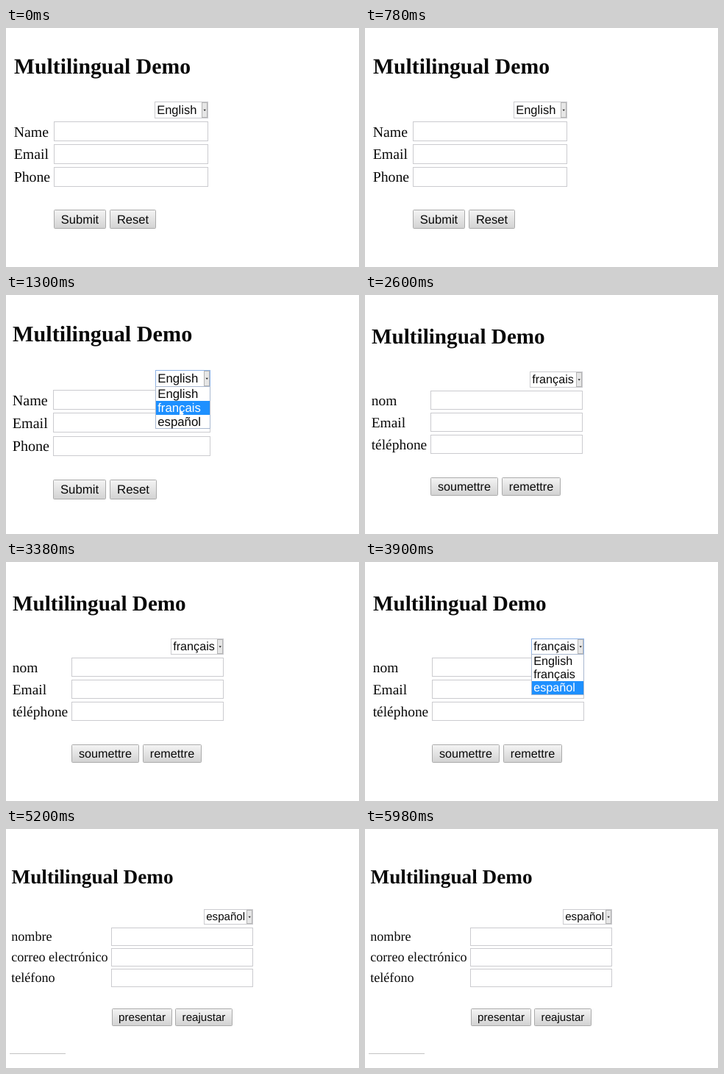
An HTML page that plays this animation: 480 by 325 pixels, repeating every 6.5 s.

```html
<!DOCTYPE html>
<html lang="en">
<head>
<meta charset="utf-8">
<title>Multilingual Demo</title>
<style>
html, body { margin: 0; width: 100%; height: 100%; overflow: hidden; background: #fff; }
svg { display: block; width: 480px; height: 325px; }
.scene { visibility: hidden; animation: show 6.5s step-end infinite; }
@keyframes show { 0% { visibility: visible; } 20%, 100% { visibility: hidden; } }
text { fill: #0a0a0a; white-space: pre; text-rendering: geometricPrecision; }
.title { font-family: "Liberation Serif", "Times New Roman", serif; font-weight: bold; }
.label { font-family: "Liberation Serif", "Times New Roman", serif; }
.ui { font-family: "Liberation Sans", Arial, sans-serif; }
.ui.picked { fill: #fff; }
.field { fill: #fff; stroke: #cbcbcf; }
.open { fill: #fff; stroke: #8db2e6; }
.list { fill: #fff; stroke: #a9b8d0; }
.arrow { fill: #e6e6e6; stroke: #b4b4b4; }
.button { fill: url(#face); stroke: #ababab; }
.hot { fill: #1e90ff; }
</style>
</head>
<body>
<svg id="stage" viewBox="0 0 480 325">
  <defs>
    <linearGradient id="face" x1="0" y1="0" x2="0" y2="1">
      <stop offset="0" stop-color="#f4f4f4"/>
      <stop offset="1" stop-color="#d2d2d2"/>
    </linearGradient>
  </defs>
</svg>
<script>
const languages = ["English", "français", "español"];
const words = [
  { labels: ["Name", "Email", "Phone"], buttons: ["Submit", "Reset"] },
  { labels: ["nom", "Email", "téléphone"], buttons: ["soumettre", "remettre"] },
  { labels: ["nombre", "correo electrónico", "teléfono"], buttons: ["presentar", "reajustar"] }
];

// size: label font size; select: [left, top, right, bottom]; field: [left, right, height]
// buttons: [top, bottom, left, right, left, right]; hot: highlighted menu item
const scenes = [
  { lang: 0, size: 19.8, x: 11, title: 62.2, select: [202, 100, 274, 122], field: [65, 274, 26],
    tops: [127, 158, 189], bases: [147.7, 178.2, 209], buttons: [247, 272, 65, 135, 141, 203] },
  { lang: 0, size: 20.15, x: 9, title: 63, select: [203, 102, 277, 124], field: [64, 277, 26],
    tops: [129, 160, 192], bases: [150, 181, 212], buttons: [251, 277, 64, 135, 141, 204],
    hot: 1, pointer: [236, 156] },
  { lang: 1, size: 19.45, x: 9, title: 65.8, select: [224, 104, 295, 125], field: [89, 295, 25],
    tops: [130, 160, 190], bases: [149.8, 179.8, 209.8], buttons: [248, 272, 89, 180, 186, 265] },
  { lang: 1, size: 19.45, x: 11, title: 65.8, select: [226, 104, 297, 125], field: [91, 297, 25],
    tops: [130, 160, 190], bases: [149.8, 179.8, 209.8], buttons: [248, 272, 91, 182, 188, 267],
    hot: 2 },
  { lang: 2, size: 18.15, x: 7.5, title: 74.4, select: [269, 109, 335, 129], field: [143, 335, 24],
    tops: [134, 162, 190], bases: [152, 180, 208], buttons: [244, 267, 144, 225, 230, 307],
    rule: [5, 81, 305] }
];

function add(parent, tag, attrs, content) {
  const node = document.createElementNS("http://www.w3.org/2000/svg", tag);
  for (const key in attrs) node.setAttribute(key, attrs[key]);
  if (content) node.textContent = content;
  return parent.appendChild(node);
}

function box(g, kind, left, top, right, bottom, rx = 0) {
  add(g, "rect", { class: kind, x: left + .5, y: top + .5, width: right - left, height: bottom - top, rx });
}

function write(g, kind, x, y, size, content, anchor = "start") {
  add(g, "text", { class: kind, x, y, "font-size": size, "text-anchor": anchor }, content);
}

function drawSelect(g, s, small) {
  const [left, top, right, bottom] = s.select;
  const middle = (top + bottom) / 2 + .5;
  box(g, s.hot ? "open" : "field", left, top, right, bottom);
  box(g, "arrow", right - 8, top + 1, right - 1, bottom - 1);
  add(g, "path", { d: `M${right - 5.5} ${middle - .8}h3.4l-1.7 2.2z`, fill: "#222" });
  write(g, "ui", left + 3.2, middle + small * .33, small, languages[s.lang]);
}

function drawMenu(g, s, small) {
  const [left, , right, bottom] = s.select;
  const row = small * 1.13;
  box(g, "list", left, bottom, right, bottom + Math.round(row * 3));
  languages.forEach((name, i) => {
    const y = Math.round(bottom + .6 + i * row);
    if (i === s.hot) {
      add(g, "rect", { class: "hot", x: left + 1, y, width: right - left - 1, height: Math.round(row) });
    }
    write(g, i === s.hot ? "ui picked" : "ui", left + 3.2, y + row * .79, small, name);
  });
}

scenes.forEach((s, i) => {
  const g = add(stage, "g", { class: "scene", style: `animation-delay:${i * 1.3 - 6.5}s` });
  const { labels, buttons } = words[s.lang];
  const small = s.size * 5 / 6;
  const [left, right, height] = s.field;
  const [top, bottom, ...edges] = s.buttons;

  write(g, "title", s.x, s.title, s.size * 1.5, "Multilingual Demo");
  labels.forEach((label, n) => {
    write(g, "label", s.x - .3, s.bases[n], s.size, label);
    box(g, "field", left, s.tops[n], right, s.tops[n] + height);
  });
  buttons.forEach((name, n) => {
    const [a, b] = edges.slice(n * 2);
    box(g, "button", a, top, b, bottom, 1);
    write(g, "ui", (a + b + 1) / 2, (top + bottom + 1) / 2 + small * .34, small, name, "middle");
  });
  drawSelect(g, s, small);
  if (s.hot) drawMenu(g, s, small);
  if (s.pointer) add(g, "path", { d: `M${s.pointer}v8l2-2 2 3 1-1-1-2.5h2z`, fill: "#fff" });
  if (s.rule) add(g, "path", { d: `M${s.rule[0]} ${s.rule[2] + .5}H${s.rule[1]}`, stroke: "#c4c4c4" });
});
</script>
</body>
</html>
```
